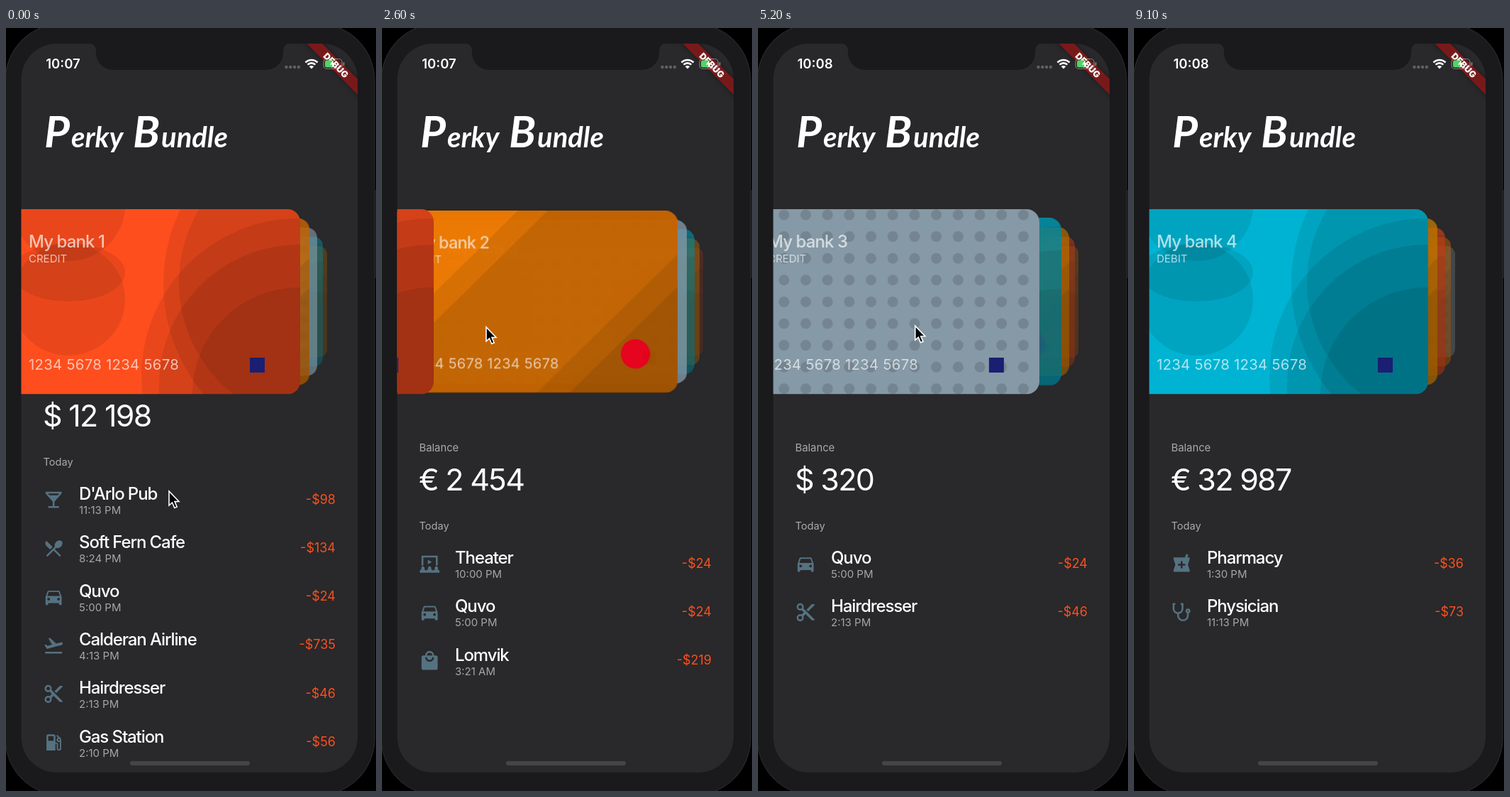
Recreate the animation shown at these times as an HTML page with a canvas. Size 522 px wide and 1074 px high, loop 9200 ms.

```html
<!DOCTYPE html>
<html lang="en">
<head>
<meta charset="utf-8">
<title>Wallet</title>
<style>
html, body { margin: 0; width: 100%; height: 100%; overflow: hidden; background: #000; }
canvas { display: block; width: 522px; height: 1074px; }
</style>
</head>
<body>
<canvas id="stage"></canvas>
<script>
const W = 522, H = 1074, LOOP = 9200;
const CARD = { x: 1, y: 255, w: 414, h: 260.5 };
const FONT = 'Inter, "Open Sans", sans-serif';
const dpr = window.devicePixelRatio || 1;

const stage = document.getElementById('stage');
stage.width = W * dpr;
stage.height = H * dpr;
const ctx = stage.getContext('2d');

// 24-unit icons; drawn with the even-odd rule
const icons = {
  bar: 'M3 3H21V5L13 14V19H18V21H6V19H11V14L3 5ZM5.7 5L7.4 7H16.6L18.4 5Z',
  dining: 'M8.1 13.3L10.9 10.5L3.9 3.5A4 4 0 0 0 3.9 9.2ZM14.9 11.5C16.4 12.2 18.6 11.7 20.2 10.1C22 8.2 22.4 5.5 21 4C19.5 2.6 16.7 2.9 14.8 4.8C13.2 6.4 12.7 8.6 13.4 10.1L3.7 19.9L5.1 21.3L12 14.4L18.9 21.3L20.3 19.9L13.4 13Z',
  car: 'M3 12L5.1 6Q5.5 5 6.5 5H17.5Q18.5 5 18.9 6L21 12V20Q21 21 20 21H19Q18 21 18 20V19H6V20Q6 21 5 21H4Q3 21 3 20ZM5 11H19L17.5 6.5H6.5ZM5 14.5A1.5 1.5 0 1 0 8 14.5A1.5 1.5 0 1 0 5 14.5ZM16 14.5A1.5 1.5 0 1 0 19 14.5A1.5 1.5 0 1 0 16 14.5Z',
  plane: 'M2.5 19H21.5V21H2.5ZM22.1 9.6A1.5 1.5 0 0 0 20.2 8.6L14.9 10L8 3.6L6.1 4.1L10.2 11.2L5.3 12.6L3.3 11L1.8 11.4L4.4 15.9L21 11.5A1.5 1.5 0 0 0 22.1 9.6Z',
  cut: 'M9.6 7.6A4 4 0 1 0 7.6 9.6L10 12L7.6 14.4A4 4 0 1 0 9.6 16.4L12 14L19 21H22V20ZM4 6A2 2 0 1 0 8 6A2 2 0 1 0 4 6ZM4 18A2 2 0 1 0 8 18A2 2 0 1 0 4 18ZM19 3L13 9L15 11L22 4V3Z',
  gas: 'M4 5Q4 3 6 3H12Q14 3 14 5V12H15Q17 12 17 14V18.5A1 1 0 0 0 19 18.5V11.3A2.5 2.5 0 1 1 17.1 6.7L15 4.6L16.1 3.5L19.8 7.2Q20.5 8 20.5 9V18.5A2.5 2.5 0 0 1 15.5 18.5V13.5H14V21H4ZM6 5V10H12V5ZM17 9A1 1 0 1 0 19 9A1 1 0 1 0 17 9Z',
  show: 'M3 3H21V14H19V5H5V14H3ZM10 7.5L14.5 10L10 12.5ZM1 22V20Q1 18.5 3 18.3A2 2 0 1 1 6 18.3Q8 18.5 8 20Q8 18.5 10.5 18.3A2 2 0 1 1 13.5 18.3Q16 18.5 16 20Q16 18.5 18 18.3A2 2 0 1 1 21 18.3Q23 18.5 23 20V22Z',
  bag: 'M5 6H7A5 5 0 0 1 17 6H19Q21 6 21 8V20Q21 22 19 22H5Q3 22 3 20V8Q3 6 5 6ZM9 6H15A3 3 0 0 0 9 6ZM7 8A5 5 0 0 0 17 8H15A3 3 0 0 1 9 8Z',
  pharmacy: 'M21 5H18.4L19.5 1.9L17.1 1L15.7 5H3V7L5 13L3 19V21H21V19L19 13L21 7ZM16 14H13V17H11V14H8V12H11V9H13V12H16Z',
  doctor: 'M5 2.8H3V8A5 5 0 0 0 13 8V2.8H11M8 13V15.5A5.5 5.5 0 0 0 19 15.5V12.5M17.4 10.5A1.7 1.7 0 1 0 20.8 10.5A1.7 1.7 0 1 0 17.4 10.5'
};
for (const k in icons) icons[k] = new Path2D(icons[k]);

const ride = ['car', 'Quvo', '5:00 PM', '-$24'];
const barber = ['cut', 'Hairdresser', '2:13 PM', '-$46'];
const cards = [
  { kind: 'CREDIT', color: '#ff4e1d', art: rings, mark: 'square', sum: '$ 12 198', rows: [
    ['bar', "D'Arlo Pub", '11:13 PM', '-$98'],
    ['dining', 'Soft Fern Cafe', '8:24 PM', '-$134'],
    ride,
    ['plane', 'Calderan Airline', '4:13 PM', '-$735'],
    barber,
    ['gas', 'Gas Station', '2:10 PM', '-$56']] },
  { kind: 'DEBIT', color: '#f07a00', art: bands, mark: 'circle', sum: '€ 2 454', rows: [
    ['show', 'Theater', '10:00 PM', '-$24'],
    ride,
    ['bag', 'Lomvik', '3:21 AM', '-$219']] },
  { kind: 'CREDIT', color: '#8599a6', art: dots, mark: 'square', sum: '$ 320', rows: [ride, barber] },
  { kind: 'DEBIT', color: '#00b3d2', art: rings, mark: 'square', sum: '€ 32 987', rows: [
    ['pharmacy', 'Pharmacy', '1:30 PM', '-$36'],
    ['doctor', 'Physician', '11:13 PM', '-$73']] },
  { kind: 'DEBIT', color: '#e08a00', art: bands, mark: 'circle', sum: '', rows: [] }
];

// [time, value...] keys
const scrollKeys = [[0, -90], [250, -90], [1000, 53], [1100, 50], [1550, 0]];
const cursorKeys = [
  [0, 229, 651], [250, 229, 651], [1000, 248, 1050], [1250, 250, 1050], [1950, 241, 421],
  [2100, 234, 420], [2450, 146, 420], [2750, 146, 420], [3350, 234, 418], [3640, 234, 418],
  [4050, 145, 418], [4450, 145, 417], [4950, 236, 418], [5100, 236, 418], [5500, 140, 420],
  [5700, 138, 430], [6100, 135, 574]
];
const swipes = [[2050, 2800], [3640, 4420], [5100, 5900]];
const CURSOR_GONE = 6800, MINUTE_TICK = 5100;

const smooth = u => u * u * (3 - 2 * u);

function sample(keys, t) {
  const i = keys.findIndex(k => k[0] > t);
  if (i < 0) return keys[keys.length - 1].slice(1);
  const a = keys[i - 1], b = keys[i];
  const u = smooth((t - a[0]) / (b[0] - a[0]));
  return a.slice(1).map((v, n) => v + (b[n + 1] - v) * u);
}

function text(c, str, x, y, size, color, { weight = 400, gap = 0, align = 'left' } = {}) {
  c.font = `${weight} ${size}px ${FONT}`;
  c.letterSpacing = gap + 'px';
  c.textAlign = align;
  c.fillStyle = color;
  c.fillText(str, x, y);
  c.letterSpacing = '0px';
}

function box(c, x, y, w, h, r) {
  c.beginPath();
  c.roundRect(x, y, w, h, r);
}

function disc(c, x, y, rx, ry = rx) {
  c.beginPath();
  c.ellipse(x, y, rx, ry, 0, 0, Math.PI * 2);
  c.fill();
}

function rings(c) {
  c.fillStyle = 'rgba(0,0,0,.085)';
  disc(c, 88, 250, 80, 78);
  disc(c, 88, 344, 80, 41);
  disc(c, 88, 382, 80, 79);
  disc(c, 464, 360, 242);
  disc(c, 444, 358, 200);
  disc(c, 413, 490, 222);
  disc(c, 413, 502, 197);
  disc(c, 413, 515, 150);
}

function bands(c) {
  c.fillStyle = 'rgba(0,0,0,.09)';
  for (const x of [185, 228, 478, 525]) {
    c.beginPath();
    c.moveTo(x, 255);
    c.lineTo(x - 266, 516);
    c.lineTo(900, 516);
    c.lineTo(900, 255);
    c.fill();
  }
}

function dots(c) {
  c.fillStyle = 'rgba(0,0,0,.13)';
  for (let i = 0; i < 13; i++)
    for (let j = 0; j < 9; j++) disc(c, 392.5 - i * 30.7, 263 + j * 30.6, 7.5);
}

function renderCard(card, i) {
  const cv = document.createElement('canvas');
  cv.width = CARD.w * dpr;
  cv.height = Math.ceil(CARD.h) * dpr;
  const c = cv.getContext('2d');
  c.scale(dpr, dpr);
  c.translate(-CARD.x, -CARD.y);
  box(c, CARD.x, CARD.y, CARD.w, CARD.h, 18);
  c.clip();
  c.fillStyle = card.color;
  c.fillRect(CARD.x, CARD.y, CARD.w, CARD.h);
  card.art(c);
  const ink = 'rgba(255,255,255,.68)';
  text(c, 'My bank ' + (i + 1), 32, 309, 24, ink, { weight: 500, gap: -0.9 });
  text(c, card.kind, 32, 330, 15, ink);
  text(c, '1234 5678 1234 5678', 32, 481, 20.3, ink, { gap: 0.3 });
  if (card.mark === 'square') {
    c.fillStyle = '#1a1f71';
    c.fillRect(344, 464, 21, 21);
  } else {
    c.fillStyle = '#eb001b';
    disc(c, 354, 460, 21);
  }
  return cv;
}
const faces = cards.map(renderCard);

function placeCard(i, p) {
  const back = Math.max(p, 0);
  const s = 1 - 0.1 * back;
  const right = p < 0 ? 415 + CARD.w * p : 415 + 14.6 * p - 1.3 * p * p;
  const h = Math.ceil(CARD.h);
  ctx.globalAlpha = p > 4 ? 0.28 * (5 - p) : 1 - 0.18 * back;
  ctx.drawImage(faces[i % 5], right - CARD.w * s, 385.5 - h * s / 2, CARD.w * s, h * s);
  ctx.globalAlpha = 1;
}

function drawIcon(name, x, y) {
  ctx.save();
  ctx.translate(x - 15, y - 15);
  ctx.scale(1.264, 1.264);
  ctx.fillStyle = ctx.strokeStyle = '#557281';
  ctx.lineWidth = 2;
  if (name === 'doctor') ctx.stroke(icons[name]);
  else ctx.fill(icons[name], 'evenodd');
  ctx.restore();
}

function drawSheet(card, dy) {
  ctx.save();
  ctx.translate(0, dy);
  text(ctx, 'Balance', 52.5, 595.5, 14.8, '#aaa9ab');
  text(ctx, card.sum, 52, 650.5, 43, '#fff', { gap: -1.7 });
  text(ctx, 'Today', 52.5, 705.5, 14.6, '#aaa9ab');
  card.rows.forEach(([icon, name, time, cost], i) => {
    const y = i * 68.3;
    drawIcon(icon, 67, 754 + y);
    text(ctx, name, 103, 754 + y, 24, '#fff', { weight: 500, gap: -1.1 });
    text(ctx, time, 103, 774 + y, 15, '#a6a5a7');
    text(ctx, cost, 465, 759.5 + y, 18, '#f9501f', { align: 'right' });
  });
  ctx.restore();
}

function drawTitle() {
  const part = (str, x, size) => {
    ctx.font = `italic 700 ${size}px Lato, sans-serif`;
    ctx.fillText(str, x, 168);
  };
  ctx.fillStyle = '#fff';
  ctx.textAlign = 'left';
  part('P', 54, 62);
  part('erky', 92, 40);
  part('B', 179, 62);
  part('undle', 219, 40);
}

function drawBattery() {
  ctx.strokeStyle = 'rgba(255,255,255,.4)';
  ctx.lineWidth = 1.2;
  box(ctx, 448, 43.5, 26, 14, 4.5);
  ctx.stroke();
  ctx.fillStyle = 'rgba(255,255,255,.4)';
  box(ctx, 475.5, 48, 2, 5, 1);
  ctx.fill();
  ctx.fillStyle = '#4cd663';
  box(ctx, 450, 45.5, 12, 10, 2.5);
  ctx.fill();
  ctx.fillStyle = '#fff';
  ctx.beginPath();
  [[462, 45], [457, 51.5], [460.5, 51.5], [459.5, 56.5], [465, 49.5], [461.5, 49.5]]
    .forEach(p => ctx.lineTo(...p));
  ctx.fill();
}

function drawStatus(t) {
  ctx.fillStyle = '#1a191c';
  ctx.beginPath();
  ctx.moveTo(116, 21);
  ctx.quadraticCurveTo(127, 22, 127, 33);
  ctx.arcTo(127, 59, 152, 59, 24);
  ctx.arcTo(391, 59, 391, 33, 24);
  ctx.lineTo(391, 33);
  ctx.quadraticCurveTo(391, 22, 402, 21);
  ctx.fill();

  text(ctx, t < MINUTE_TICK ? '10:07' : '10:08', 80.5, 57, 18.5, '#fff', { weight: 600, align: 'center' });
  ctx.fillStyle = '#605f62';
  for (let i = 0; i < 4; i++) disc(ctx, 395.5 + i * 5.8, 55, 2.2);

  ctx.strokeStyle = ctx.fillStyle = '#fff';
  ctx.lineWidth = 2.7;
  for (const r of [12, 7.6]) {
    ctx.beginPath();
    ctx.arc(431, 57, r, -Math.PI * 0.75, -Math.PI * 0.25);
    ctx.stroke();
  }
  ctx.beginPath();
  ctx.moveTo(431, 57.5);
  ctx.arc(431, 57.5, 4.6, -Math.PI * 0.75, -Math.PI * 0.25);
  ctx.fill();
  drawBattery();
}

function drawBanner() {
  ctx.save();
  ctx.translate(496, 22);
  ctx.rotate(Math.PI / 4);
  ctx.shadowColor = 'rgba(0,0,0,.5)';
  ctx.shadowBlur = 7 * dpr;
  ctx.fillStyle = 'rgba(150,25,25,.76)';
  ctx.fillRect(-70, 35.4, 140, 15.2);
  ctx.shadowColor = 'transparent';
  text(ctx, 'DEBUG', 0, 47.6, 12.6, '#fff', { weight: 900, align: 'center' });
  ctx.restore();
}

function drawCursor(x, y) {
  ctx.save();
  ctx.translate(x, y);
  ctx.beginPath();
  [[1, 1], [1, 21], [5.5, 17], [8.7, 24.5], [12.2, 23], [9, 15.6], [15, 15.4]]
    .forEach(p => ctx.lineTo(...p));
  ctx.closePath();
  ctx.fillStyle = '#000';
  ctx.strokeStyle = '#fff';
  ctx.lineWidth = 1.6;
  ctx.fill();
  ctx.stroke();
  ctx.restore();
}

function drawPhone() {
  ctx.fillStyle = '#000';
  ctx.fillRect(0, 0, W, H);
  ctx.fillStyle = '#1a191c';
  ctx.fillRect(519, 228, 3, 124);
  box(ctx, -1, -6, 521, 1086, 80);
  ctx.fill();
  ctx.strokeStyle = '#29282b';
  ctx.lineWidth = 1.2;
  ctx.stroke();
}

function draw(t) {
  ctx.setTransform(dpr, 0, 0, dpr, 0, 0);
  drawPhone();

  ctx.save();
  box(ctx, 21.5, 22, 474.5, 1026, 50);
  ctx.clip();
  ctx.fillStyle = '#29282a';
  ctx.fillRect(21, 22, 475, 1026);
  drawTitle();

  const pos = swipes.reduce((sum, [a, b]) =>
    sum + smooth(Math.min(1, Math.max(0, (t - a) / (b - a)))), 0);
  drawSheet(cards[Math.round(pos)], sample(scrollKeys, t)[0]);

  const front = Math.floor(pos), q = pos - front;
  for (let i = q > 0 ? 5 : 4; i >= 0; i--) placeCard(front + i, i - q);

  drawBanner();
  drawStatus(t);
  ctx.fillStyle = '#454447';
  box(ctx, 175, 1032, 169, 6, 3);
  ctx.fill();
  ctx.restore();

  if (t < CURSOR_GONE) drawCursor(...sample(cursorKeys, t));
}

const start = performance.now();
function tick() {
  draw((performance.now() - start) % LOOP);
  requestAnimationFrame(tick);
}
tick();
</script>
</body>
</html>
```
